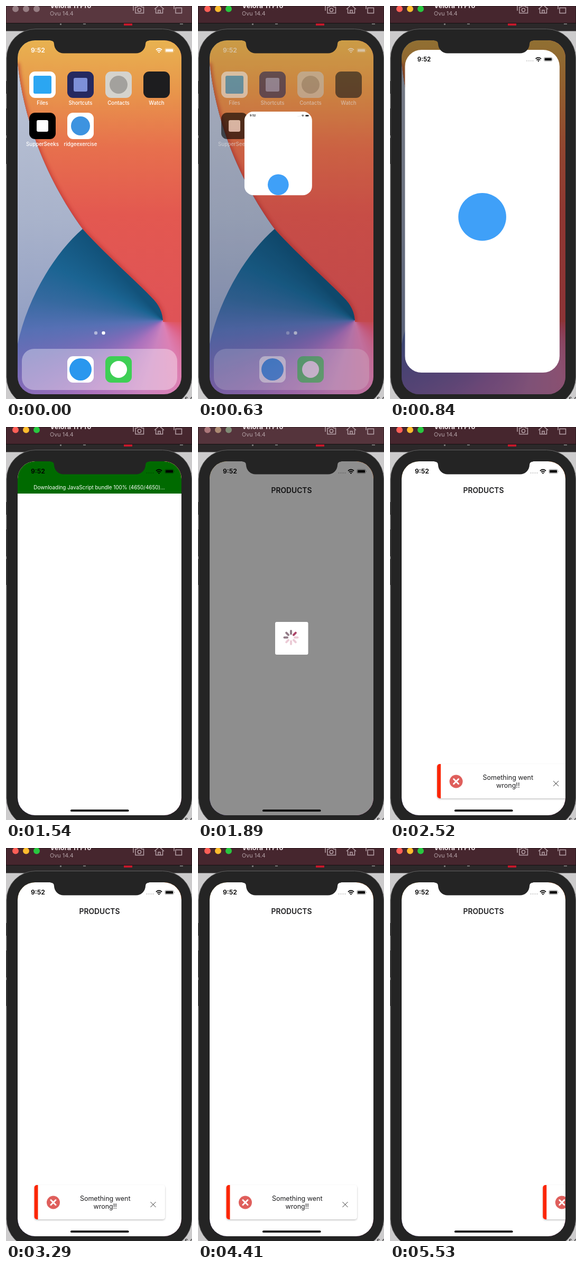
Write an HTML page that moves like this. It is 352 by 744 pixels and loops after 5.6 s.

```html
<!DOCTYPE html>
<html lang="en">
<head>
<meta charset="utf-8">
<title>Phone simulator</title>
<style>
html, body { margin: 0; width: 100%; height: 100%; overflow: hidden; background: #cccbcc; }
svg { display: block; width: 352px; height: 744px; font-family: Inter, Roboto, sans-serif; }
.mid { text-anchor: middle; }
.glow { width: 310px; height: 670px; background: conic-gradient(at 275px 530px,
  #d9505a 0deg, #df5357 90deg, #de6084 125deg, #dc80b4 165deg, #cb82be 195deg, #ac72bd 225deg,
  #7d6bb8 248deg, #5670b4 266deg, #35699f 280deg, #1b6492 296deg, #12527a 318deg, #12527a 340deg); }
</style>
</head>
<body>
<svg viewBox="0 0 352 744">
<defs>
  <linearGradient id="red" x2="0" y2="1">
    <stop offset="0" stop-color="#e8b250"/><stop offset=".18" stop-color="#e8964b"/>
    <stop offset=".38" stop-color="#e7704d"/><stop offset=".62" stop-color="#e35850"/>
    <stop offset="1" stop-color="#df5357"/>
  </linearGradient>
  <linearGradient id="grey" x2="0" y2="1">
    <stop offset="0" stop-color="#bcc4d6"/><stop offset=".55" stop-color="#a9b3cb"/>
    <stop offset="1" stop-color="#8f9cc2"/>
  </linearGradient>
  <clipPath id="screen"><rect x="22" y="65" width="310" height="670" rx="33"/></clipPath>
  <clipPath id="window"><rect id="frame"/></clipPath>
  <path id="flame" d="M22 65V108C35 230 85 340 145 422C180 462 240 515 275 551Q297 572 297 598H332V65Z"/>
  <clipPath id="inFlame"><use href="#flame"/></clipPath>
  <filter id="soft"><feGaussianBlur stdDeviation="3"/></filter>
  <filter id="shadow" x="-10%" y="-20%" width="120%" height="150%">
    <feDropShadow dx="0" dy="1.5" stdDeviation="1.6" flood-opacity=".25"/>
  </filter>
  <g id="status" fill="currentColor">
    <text x="47" y="88.400" font-size="12.300" font-weight="600">9:52</text>
    <g fill="none" stroke="currentColor" stroke-width="1.800">
      <path d="M284 83Q289.500 78 295 83M286 85.500Q289.500 82.300 293 85.500"/>
      <rect x="300.700" y="80.200" width="16.500" height="7.600" rx="2.300" stroke-width=".8" opacity=".45"/>
    </g>
    <circle cx="289.500" cy="87.200" r="1.300"/>
    <rect x="302" y="81.400" width="14" height="5.200" rx="1.200"/>
    <path d="M318.200 82.700q1.500 1.300 0 2.600z" opacity=".5"/>
  </g>
</defs>

<!-- desktop behind the phone -->
<rect width="352" height="744" fill="#cccbcc"/>
<rect y="32" width="352" height="15.500" fill="#2b2829"/>
<path d="M223 33h16v4h-16z" fill="#c3192b"/>
<path d="M102 33h3v3h-3zM146 33h5v2h-5zM329 33h6v2h-6z" fill="#777"/>
<path d="M0 142h4v24H0zM0 194h4v51H0zM0 250h4v49H0z" fill="#0c0c0c"/>
<text x="338" y="748" font-size="13" fill="#222">s c</text>

<rect x="1" y="43.500" width="350.500" height="714" rx="55" fill="#242424" stroke="#626262"/>

<g clip-path="url(#screen)">
  <foreignObject x="22" y="65" width="310" height="670"><div class="glow"></div></foreignObject>
  <path d="M22 108C35 230 85 340 145 422C90 470 40 555 22 640Z" fill="url(#grey)"/>
  <use href="#flame" fill="url(#red)"/>
  <g clip-path="url(#inFlame)">
    <path d="M22 108C35 230 85 340 145 422C180 462 240 515 275 551Q297 572 297 598" fill="none"
      stroke="#b92f2f" stroke-width="7" opacity=".6" filter="url(#soft)"/>
  </g>
  <g id="home">
    <use href="#status" color="#fff"/>
    <rect x="30" y="649" width="294" height="78" rx="23" fill="#fff" opacity=".36"/>
    <g id="icons"></g>
    <circle cx="170" cy="619" r="3.200" fill="#fff" opacity=".5"/>
    <circle cx="184.500" cy="619" r="3.200" fill="#fff"/>
  </g>
  <rect id="shade" x="22" y="65" width="310" height="670"/>

  <g id="app" clip-path="url(#window)"><g id="page">
    <rect x="22" y="65" width="310" height="670" fill="#fff"/>
    <circle id="splash" cx="177" cy="400" r="48" fill="#3fa0f8"/>
    <g id="bar">
      <rect x="22" y="65" width="310" height="61" fill="#006a00"/>
      <text id="load" class="mid" x="176.500" y="117.500" font-size="9.900" fill="#fff"></text>
    </g>
    <use href="#status" color="#000"/>
    <path d="M265.500 87h14.500" stroke="#000" stroke-width="2" stroke-dasharray="2 2" opacity=".2"/>
    <text id="title" class="mid" x="177" y="124.900" font-size="13.800" font-weight="600" fill="#1c1c1e">PRODUCTS</text>
    <g id="toast">
      <rect x="53.500" y="638" width="247.500" height="65" rx="5" fill="#fff" filter="url(#shadow)"/>
      <path d="M60.500 638H58.500a5 5 0 0 0-5 5V698a5 5 0 0 0 5 5H60.500Z" fill="#fb2606"/>
      <circle cx="89.500" cy="671" r="12.500" fill="#df5f5c"/>
      <path d="M85 666.500l9 9m0-9l-9 9" stroke="#fff" stroke-width="3" stroke-linecap="round"/>
      <g class="mid" font-size="12.500" fill="#1c1c1e">
        <text x="187.700" y="668">Something went</text><text x="187.700" y="683">wrong!!</text>
      </g>
      <path d="M273.500 670l10 10m0-10l-10 10" stroke="#333"/>
    </g>
    <rect x="122" y="724.300" width="110.500" height="3.800" rx="1.900"/>
    <g id="modal">
      <rect x="22" y="65" width="310" height="670" opacity=".443"/>
      <rect x="146" y="369" width="62.500" height="62" rx="3" fill="#fff"/>
      <g id="spokes" stroke-width="4" stroke-linecap="round"></g>
    </g>
  </g></g>
  <path d="M84 64H271V65.500Q264 65.500 264 72A18 18 0 0 1 246 89.500H109A18 18 0 0 1 91 72Q91 65.500 84 65.500Z" fill="#242424"/>
</g>

<!-- simulator title bar -->
<rect id="head" width="352" height="32.500" stroke="#171012"/>
<g id="lights"></g>
<text x="83" y="4" font-size="12.800" font-weight="700" fill="#eee4e7">Velora 11 Pro</text>
<text x="83" y="18" font-size="10.800" fill="#b3a1a6">Ovu 14.4</text>
<g fill="none" stroke="#b5a0a7" stroke-width="1.500">
  <path d="M245 2h3l2-2h5l2 2h3.500v11.500H245zM241 -2v11"/><circle cx="252.500" cy="7.500" r="3.200"/>
  <path d="M281 6l9-8 9 8M283.500 5v8.500h13V5M288 13V8h4v5"/>
  <path d="M321 3.500h11.500v10H321zM318 6V-1h8"/>
</g>
</svg>
<script>
const $ = id => document.getElementById(id);
const set = (id, attrs) => { for (const k in attrs) $(id).setAttribute(k, attrs[k]); };
const clamp = v => Math.min(1, Math.max(0, v));
const ramp = (t, start, span) => clamp((t - start) / span);
const show = (id, v) => set(id, { opacity: +v });

// x, y, tile colour, label, shape, shape colour, shape size
const apps = [
  [44, 124, '#fff', 'Files', 'square', '#2ba6f2', 34],
  [116, 124, '#252960', 'Shortcuts', 'square', '#7d8fd8', 26],
  [188, 124, '#d5d3cd', 'Contacts', 'circle', '#a3a19d', 34],
  [260, 124, '#1d1d1f', 'Watch'],
  [44, 202, '#000', 'SupperSeeks', 'square', '#fff', 22],
  [116, 202, '#fff', 'ridgeexercise', 'circle', '#3d93e0', 36],
  [116, 663, '#fff', '', 'circle', '#2a97ee', 42],
  [188, 663, '#3ecf55', '', 'circle', '#fff', 32]
];
$('icons').innerHTML = apps.map(([x, y, tile, label, shape, color, size]) =>
  `<rect x="${x}" y="${y}" width="50" height="50" rx="11" fill="${tile}"/>` +
  (shape ? `<rect x="${x + 25 - size / 2}" y="${y + 25 - size / 2}" width="${size}" height="${size}"
    rx="${shape == 'circle' ? size / 2 : 3}" fill="${color}"/>` : '') +
  `<text class="mid" x="${x + 25}" y="${y + 62.8}" font-size="9.7" font-weight="500" fill="#fff">${label}</text>`
).join('');

$('lights').innerHTML = [18, 38, 58].map(x => `<circle cx="${x}" cy="5.5" r="6"/>`).join('');
$('spokes').innerHTML = [...Array(8).keys()].map(i =>
  `<path d="M176 391.500v-5.500" transform="rotate(${i * 45} 176 398.500)"/>`).join('');

const mix = (a, b, u) => `rgb(${a.map((v, i) => v + (b[i] - v) * u)})`;
const lightColors = [[255, 95, 87], [254, 188, 46], [40, 200, 64]];
const LOOP = 5600, STEP = 70, TRAVEL = 310;

// starts and ends softly, one second long
function glide(ms) {
  const p = clamp(ms / 1000), half = v => v ** 1.65 / 2;
  return p < .5 ? half(2 * p) : 1 - half(2 - 2 * p);
}

function openApp(t) {
  const k = 15.7 * Math.max(0, t - 560) / 1000;
  let p = 1 - (1 + k) * Math.exp(-k);
  if (t > 1120) p = 1;
  const w = 50 + 260 * p, h = 50 + 620 * p ** 1.45;
  const x = 141 + 36 * p - w / 2, y = 227 + 173 * p - h / 2, s = w / 310;
  set('frame', { x, y, width: w, height: h, rx: 11 + 22 * p });
  set('page', { transform: `translate(${x} ${y}) scale(${s}) translate(-22 -65)` });
  show('app', clamp(p * 4));
  show('home', 1 - clamp(p * 1.3));
  show('shade', .4 * p);
}

function draw(now) {
  const t = Math.floor(now % LOOP / STEP) * STEP;

  const blur = t < 350 ? 1 : t >= 1820 && t < 1960 ? .8 : 0;
  set('head', { fill: mix([70, 38, 46], [89, 55, 63], blur) });
  [...$('lights').children].forEach((c, i) =>
    c.setAttribute('fill', mix(lightColors[i], [150, 125, 131], blur)));

  openApp(t);
  show('splash', t < 1190);
  show('bar', t >= 1190 && t < 1610);
  const part = ramp(t, 1190, 310);
  $('load').textContent = `Downloading JavaScript bundle ${Math.round(part * 100)}% (${Math.round(part * 4650)}/4650)...`;

  show('title', t >= 1610);
  show('modal', ramp(t, 1640, 240) * (1 - ramp(t, 1900, 240)));
  const head = Math.floor((t - 1890) / 125) + 1;
  [...$('spokes').children].forEach((s, i) => {
    const age = ((head - i) % 8 + 8) % 8;
    s.setAttribute('stroke', age == 0 ? '#ad4468' : age < 4 ? '#927b87' : '#ebcbd6');
  });

  const off = 1 - glide(t - 1725) + glide(t - 4850);
  set('toast', { transform: `translate(${TRAVEL * off} 0)` });
  show('toast', t > 1700);
}

const start = performance.now();
function tick() {
  draw(performance.now() - start);
  requestAnimationFrame(tick);
}
tick();
</script>
</body>
</html>
```
